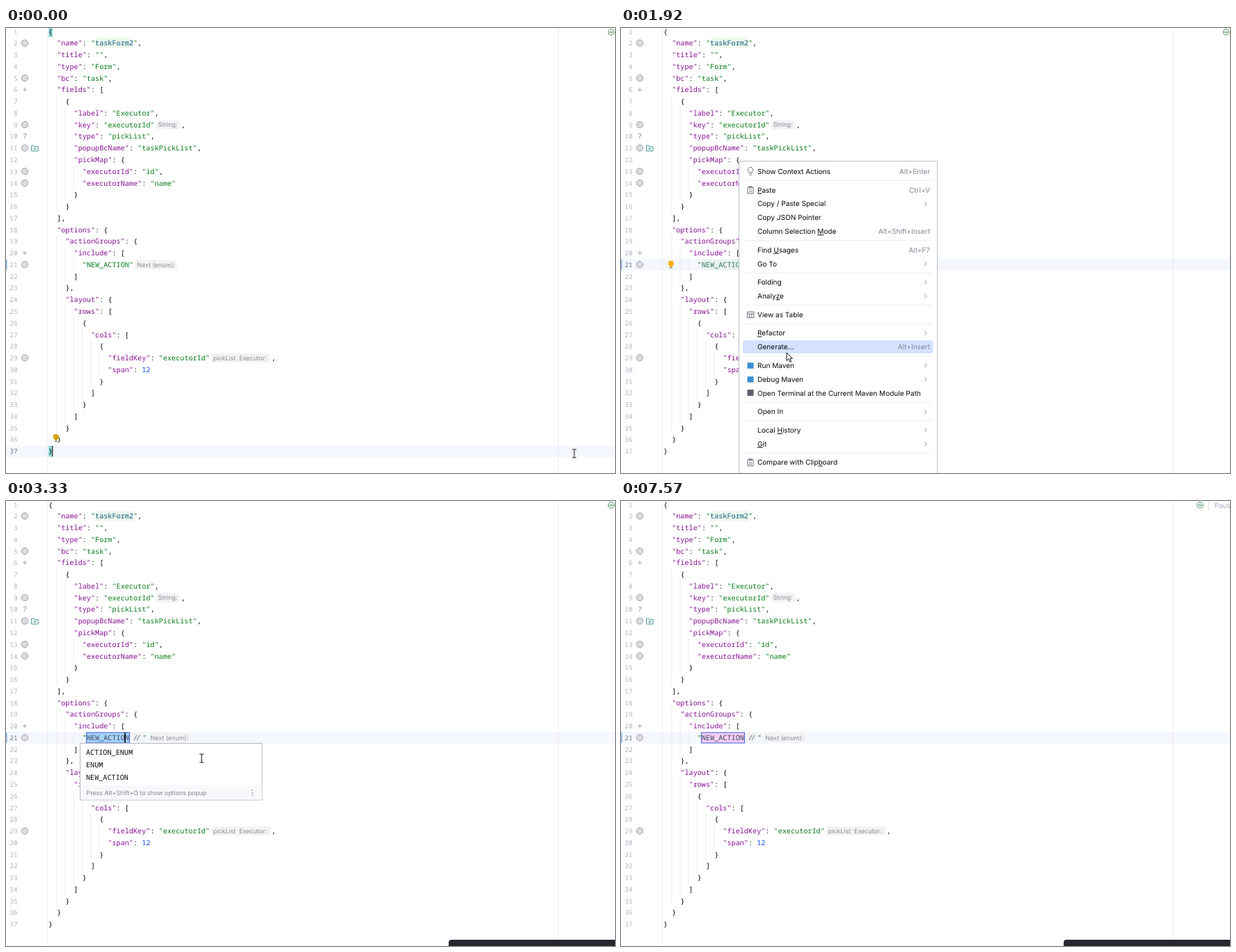
Write an HTML page that moves like this. It is 875 by 640 pixels and loops after 8000 ms.

```html
<!DOCTYPE html>
<html lang="en">
<head>
<meta charset="utf-8">
<title>Rename enum value</title>
<style>
  html, body { margin: 0; width: 100%; height: 100%; overflow: hidden; background: #fff; }
  svg { display: block; text-rendering: geometricPrecision; }
  text { white-space: pre; }
  .code { font: 10.167px "Noto Sans Mono", "DejaVu Sans Mono", monospace; }
  .num { font: 9.3px "Noto Sans Mono", "DejaVu Sans Mono", monospace; text-anchor: end; }
  .ui { font: 10.05px Inter, sans-serif; }
  .hint { font: 8.9px Inter, sans-serif; }
  .end { text-anchor: end; }
  .key { text-decoration: underline; }
</style>
</head>
<body>
<svg id="stage" width="875" height="640" viewBox="0 0 875 640"></svg>
<script>
const LOOP = 8000, LEFT = 61, CHAR = 6.1, LINE = 16.77;
const INK = '#080808', PURPLE = '#871094', GREEN = '#067d17', GREY = '#868a94', PALE = '#ebecf0';
const stage = document.getElementById('stage');

const lineY = n => 4.9 + LINE * (n - 1);
const colX = c => LEFT + CHAR * c;

function add(parent, tag, attrs = {}, content = '') {
  const node = document.createElementNS('http://www.w3.org/2000/svg', tag);
  for (const name in attrs) node.setAttribute(name, attrs[name]);
  node.textContent = content;
  parent.appendChild(node);
  return node;
}
const group = (parent = stage) => add(parent, 'g');
const rect = (parent, x, y, width, height, fill, more = {}) =>
  add(parent, 'rect', { x, y, width, height, fill, ...more });
const stroke = (parent, d, color, width = 1, fill = 'none') =>
  add(parent, 'path', { d, stroke: color, 'stroke-width': width, fill });
const label = (parent, kind, x, y, content, fill) =>
  add(parent, 'text', { class: kind, x, y: y + 3.6, fill }, content);

function play(node, frames) {
  node.animate(frames, { duration: LOOP, iterations: Infinity });
}

// Toggles a node at each given time.
function show(node, startsOn, ...times) {
  let on = startsOn;
  const frames = [{ offset: 0, opacity: +on }];
  for (const t of times) {
    on = !on;
    frames.push({ offset: t / LOOP, opacity: +on });
  }
  frames.push({ offset: 1, opacity: +on });
  play(node, frames.map(f => ({ ...f, easing: 'steps(1, end)' })));
  return node;
}

function chip(parent, x, y, content, width) {
  rect(parent, x, y - 6.5, width, 13, '#f3f3f4', { rx: 3 });
  label(parent, 'hint', x + 2.8, y - .3, content.replace(/ {2}/g, '\u00a0\u00a0'), GREY);
}

const TOKEN = /("[^"]*")(?=:)|("[^"]*")|(\d+)|[^\s"\d]+/g;
function code(parent, x, y, source) {
  for (const m of source.matchAll(TOKEN)) {
    const fill = m[1] ? PURPLE : m[2] ? GREEN : m[3] ? '#1750eb' : INK;
    const name = m[0] === '"taskForm2"';
    if (!name) { label(parent, 'code', x + CHAR * m.index, y, m[0], fill); continue; }
    const start = x + CHAR * m.index;
    rect(parent, start + CHAR, y - 7.5, CHAR * 9, 14.5, '#edf9ec');
    label(parent, 'code', start, y, '"', GREEN);
    label(parent, 'code', start + CHAR, y, 'taskForm2', '#0b5c88');
    label(parent, 'code', start + CHAR * 10, y, '"', GREEN);
  }
}

const SOURCE = `{
  "name": "taskForm2",
  "title": "",
  "type": "Form",
  "bc": "task",
  "fields": [
    {
      "label": "Executor",
      "key": "executorId"
      "type": "pickList",
      "popupBcName": "taskPickList",
      "pickMap": {
        "executorId": "id",
        "executorName": "name"
      }
    }
  ],
  "options": {
    "actionGroups": {
      "include": [
        
      ]
    },
    "layout": {
      "rows": [
        {
          "cols": [
            {
              "fieldKey": "executorId"
              "span": 12
            }
          ]
        }
      ]
    }
  }
}`.split('\n');

// Editor background
const row = n => rect(stage, 0, lineY(n) - 8.3, 875, LINE, '#f4f7fe');
show(row(37), true, 1320);
show(row(21), false, 1320);
stroke(stage, 'M59.5 0V640M793.5 0V640', PALE);
rect(stage, 0, 333, 1.6, 14.5, '#8fb6ee');
const braces = group();
rect(braces, 61, -3, 6, 16, '#93d9d9');
rect(braces, 61, 601, 6, 15.5, '#93d9d9');
rect(braces, 66.2, 601, 1.2, 15.5, '#222');
show(braces, true, 1320);

// Lines of code
SOURCE.forEach((source, i) => {
  const n = i + 1, y = lineY(n), indent = source.search(/\S|$/);
  for (let c = 2; c < indent; c += 2)
    rect(stage, colX(c) - .8, y - LINE / 2, 1, LINE, PALE);
  code(stage, LEFT, y, source);
  const number = fill => label(stage, 'num', 16.5, y, n, fill);
  if (n === 21 || n === 37) {
    show(number('#aeb3c2'), n === 21, 1320);
    show(number('#6c707e'), n === 37, 1320);
  } else number('#aeb3c2');
});
chip(stage, 216, lineY(9), 'String:', 34);
code(stage, 251.5, lineY(9), ',');
chip(stage, 295, lineY(29), 'pickList  Executor:', 85);
code(stage, 381.5, lineY(29), ',');

// Gutter
for (const n of [2, 5, 9, 11, 13, 14, 21, 29])
  add(stage, 'circle', { cx: 27, cy: lineY(n), r: 4.6, fill: '#dcdde1', stroke: '#9c9fa8' });
for (const n of [6, 20])
  stroke(stage, `M24 ${lineY(n)}h6m-3 -3v6`, '#a4a7b0');
label(stage, 'code', 24, lineY(10), '?', '#7f838e');
stroke(stage, 'M36.5 169h3.5l1.5 1.5h4.5v6.5h-9.5z', '#4f9a9a', 1, '#eef8f7');
add(stage, 'circle', { cx: 41.3, cy: 173.6, r: 1.3, fill: 'none', stroke: '#4f9a9a' });

// The enum value: plain, focused and being renamed
const enumY = lineY(21), valueX = colX(9);
const plain = show(group(), true, 3130);
show(rect(plain, valueX, 333, CHAR * 10, 15, '#e9f3ee'), false, 1320);
show(label(plain, 'code', valueX, enumY, 'NEW_ACTION', GREEN), true, 1320);
show(label(plain, 'code', valueX, enumY, 'NEW_ACTION', '#37746a'), false, 1320);
label(plain, 'code', colX(19), enumY, '"', GREEN);
chip(plain, 185.5, enumY, 'Next (enum):', 60);
label(stage, 'code', colX(8), enumY, '"', GREEN);

const rename = show(group(), false, 3130);
const frame = fill => rect(rename, 115.5, 333, 62, 15, fill, { stroke: '#3f5fd6' });
show(frame('#a6d2ff'), true, 4670);
show(frame('#f5cdf8'), false, 4670);
label(rename, 'code', valueX, enumY, 'NEW_ACTION', '#3b4a55');
rect(rename, 181, 334, 14, 13, '#f1f1f2', { rx: 3 });
stroke(rename, 'M184 344l4 -7.5M188 344l4 -7.5', '#70747d');
label(rename, 'code', 196, enumY, '"', GREEN);
chip(rename, 204.8, enumY, 'Next (enum):', 60);

show(rect(stage, 170.2, 333, 1.6, 14.5, '#000'), false, 1320, 4670);
show(rect(stage, 176.2, 333, 1.7, 14.5, '#000'), false, 4670, 5580, 6060, 6570, 7060, 7570);

// Intention bulbs
function bulb(y, fill) {
  const g = group();
  add(g, 'circle', { cx: 71.8, cy: y - 1.5, r: 4, fill });
  rect(g, 69.8, y + 1.5, 4, 2.2, fill);
  rect(g, 69.8, y + 4.2, 4, 1.3, '#6c707e');
  return g;
}
show(bulb(589.5, '#d9a413'), true, 1320);
show(bulb(340, '#ffaf0f'), false, 1890, 3030);

// Top right status
function status(x) {
  const g = group();
  add(g, 'circle', { cx: x, cy: 6, r: 4.2, fill: '#f2fcf3', stroke: '#55936a', 'stroke-width': 1.1 });
  stroke(g, `M${x - 2.3} 6h4.6`, '#3f8055', 1.2);
  return g;
}
show(status(869.5), true, 3850);
const paused = show(status(832), false, 3850);
stroke(paused, 'M844.5 0V13', '#dfe1e5');
label(paused, 'ui', 852.5, 6, 'Paus', '#a8adbd');

// Name suggestions
const popup = show(group(), false, 3230, 4590);
rect(popup, 106.5, 348.5, 261.5, 81.5, '#fff', { stroke: '#b4b7bf' });
rect(popup, 107, 409, 260.5, 20.5, '#f7f8fa');
['ACTION_ENUM', 'ENUM', 'NEW_ACTION'].forEach((name, i) =>
  label(popup, 'code', 115, 361 + 18.4 * i, name, INK));
label(popup, 'hint', 115.5, 419.3, 'Press Alt+Shift+O to show options popup', '#818594');
for (const y of [416, 419.5, 423])
  add(popup, 'circle', { cx: 354, cy: y, r: .8, fill: '#6c707e' });

// Menus
const ICONS = {
  bulb: (g, y) => stroke(g, `M184 ${y + 2.5}v-2a3.6 3.6 0 1 1 4 0v2zM184.3 ${y + 5}h3.4`, '#6c707e'),
  paste: (g, y) => stroke(g, `M182 ${y - 4}h8v9h-8zM184 ${y - 5}h4v2h-4zM184 ${y}h4m-4 2.5h4`, '#6c707e'),
  table: (g, y) => stroke(g, `M181.5 ${y - 4}h9.5v8.5h-9.5zM181.5 ${y - 1.2}h9.5M184.7 ${y - 1.2}v5.7M187.9 ${y - 1.2}v5.7`, '#6c707e'),
  blue: (g, y) => rect(g, 181.5, y - 4, 9, 8.5, '#3a8fcf'),
  dark: (g, y) => rect(g, 181.5, y - 5, 9, 9, '#5a5f6b'),
};

function itemText(g, x, y, name, fill) {
  const node = label(g, 'ui', x, y, '', fill);
  const [before, after] = name.split('_');
  add(node, 'tspan', {}, before);
  if (!after) return;
  add(node, 'tspan', { class: 'key' }, after[0]);
  add(node, 'tspan', {}, after.slice(1));
}

// An item is [text, shortcut or '>', icon, disabled]; '_' comes before the mnemonic.
function menu({ x, y, w, h, textX, items, hover, times }) {
  const g = show(group(), false, ...times), right = x + w - 10.5;
  rect(g, x, y, w, h, '#fff', { stroke: '#b9bdc9' });
  let rowY = y + 14.8;
  for (const item of items) {
    if (item === '-') {
      stroke(g, `M${x + 8} ${rowY - 6.8}H${x + w - 7.5}`, PALE);
      rowY += 6.7;
      continue;
    }
    const [name, key, icon, disabled] = item;
    if (hover[name])
      show(rect(g, x + 5.5, rowY - 9.5, w - 11.5, 18.8, '#d4e2ff', { rx: 3 }), false, ...hover[name]);
    if (icon) ICONS[icon](g, rowY);
    itemText(g, textX, rowY, name, disabled ? '#a8adbd' : INK);
    if (key === '>') stroke(g, `M${right - 8} ${rowY - 3}l3 3l-3 3`, disabled ? '#c9ccd6' : '#8b8f9c');
    else if (key) label(g, 'ui end', right, rowY, key, '#818594');
    rowY += 19.9;
  }
}

menu({
  x: 169.5, y: 191.5, w: 285, h: 470, textX: 196, times: [1420, 3030],
  items: [
    ['Show Context Actions', 'Alt+Enter', 'bulb'], '-',
    ['_Paste', 'Ctrl+V', 'paste'], ['Copy / Paste Special', '>'], ['Copy JSON Pointer'],
    ['Column Selection _Mode', 'Alt+Shift+Insert'], '-',
    ['Find _Usages', 'Alt+F7'], ['Go To', '>'], '-',
    ['Folding', '>'], ['Analy_ze', '>'], '-',
    ['View as Table', '', 'table'], '-',
    ['_Refactor', '>'], ['Generate...', 'Alt+Insert'], '-',
    ['Run Maven', '>', 'blue'], ['Debug Maven', '>', 'blue'],
    ['Open Terminal at the Current Maven Module Path', '', 'dark'], '-',
    ['Open In', '>'], '-',
    ['Local _History', '>'], ['_Git', '>'], '-',
    ['Compare with Clip_board', '', 'paste'],
  ],
  hover: {
    'Go To': [1490, 1800], 'Folding': [1800, 1830], 'Analy_ze': [1830, 1860],
    'View as Table': [1860, 1890], '_Refactor': [1890, 1920, 2140, 3030], 'Generate...': [1920, 2140],
  },
});

menu({
  x: 451.5, y: 424.5, w: 190, h: 148, textX: 464.3, times: [2340, 3030],
  items: [
    ['_Rename...', 'Shift+F6'], '-',
    ['Move Members...', 'F6'], ['Copy File...', 'F5'], ['Safe _Delete...', 'Alt+Delete'], '-',
    ['Migrate Packages and Classes', '>', '', true], '-',
    ['Invert Boolean...', '', '', true],
  ],
  hover: { '_Rename...': [2690, 3030] },
});

show(rect(stage, 636, 631, 260, 30, '#27282e', { rx: 4 }), false, 3300);

// Mouse pointer: [time, x, y, hold until the next point]
const PATH = [
  [0, 816.5, 612], [30, 816.5, 612], [300, 420, 430], [500, 220, 345], [640, 146, 317],
  [820, 172, 336], [890, 172, 337], [920, 172, 338], [1120, 171.5, 339], [1720, 172, 339],
  [1770, 177, 355], [1920, 238, 467], [1980, 242, 473], [2170, 250, 443], [2340, 250, 443],
  [2700, 462, 441], [2830, 482, 441], [3030, 482, 441], [3330, 281, 370, true],
  [3460, 284, 375, true], [3620, 272, 382, true], [LOOP, 272, 382],
];
const pointer = group();
const beam = stroke(pointer, 'M-3 -6h2q1 0 1 1q0 -1 1 -1h2M0 -5V5M-3 6h2q1 0 1 -1q0 1 1 1h2', '#222', 1.1);
const arrow = stroke(pointer, 'M0 0V11.5L2.7 9L4.6 13.4L6.6 12.5L4.7 8.3H8.3Z', '#111', 1, '#fff');
show(beam, true, 1420, 3030, 3850);
show(arrow, false, 1420, 3030);
play(pointer, PATH.map(([t, x, y, hold], i) => {
  const next = PATH[i + 1] || [t];
  const steps = hold ? 1 : Math.max(1, Math.round((next[0] - t) / 33));
  return { offset: t / LOOP, transform: `translate(${x}px, ${y}px)`, easing: `steps(${steps}, end)` };
}));
</script>
</body>
</html>
```
